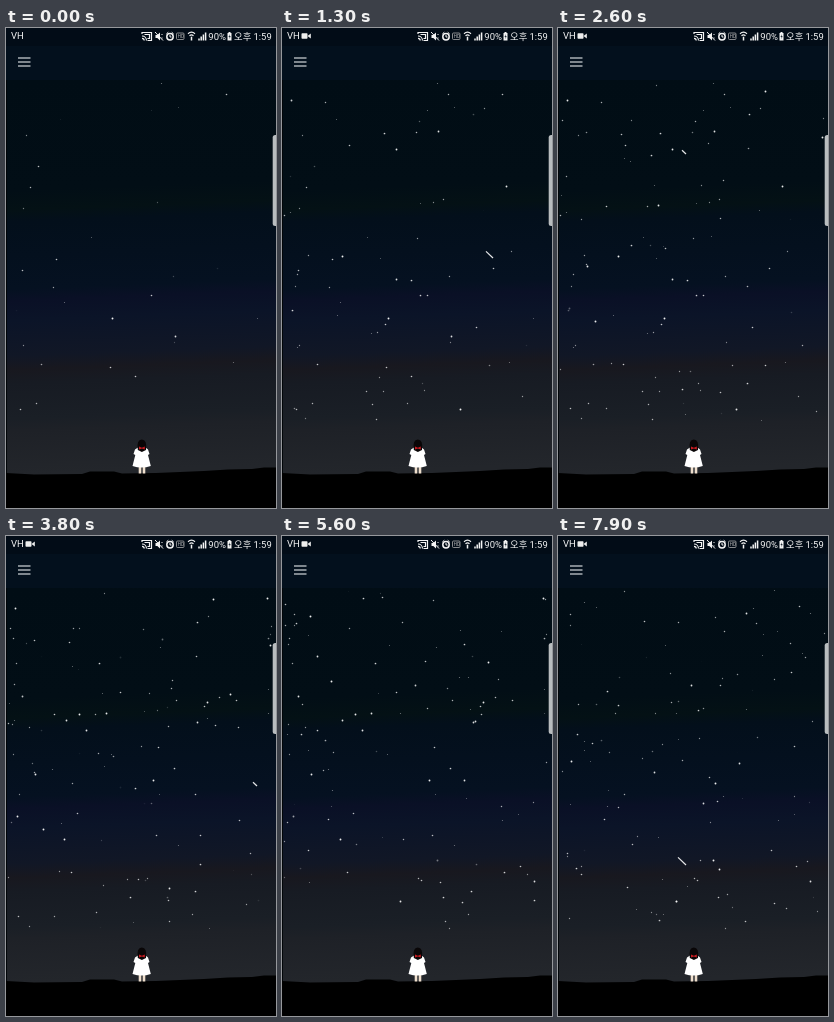
An HTML page with a canvas that plays this animation: 270x480 px, repeating every 8 s.

```html
<!DOCTYPE html>
<html lang="ko">
<head>
<meta charset="utf-8">
<title>Night sky</title>
<style>
html, body { margin: 0; width: 270px; height: 480px; overflow: hidden; background: #000; }
svg, canvas { position: absolute; left: 0; top: 0; }
text { font: 9.5px Roboto, "Noto Sans CJK KR", "Noto Sans CJK", sans-serif; fill: #f4f4f4; }
</style>
</head>
<body>
<svg width="270" height="480" viewBox="0 0 270 480">
  <defs>
    <linearGradient id="sky" gradientUnits="userSpaceOnUse" x1="0" y1="52" x2="15" y2="446">
      <stop offset="0" stop-color="#010d15"/>
      <stop offset=".28" stop-color="#020e16"/>
      <stop offset=".33" stop-color="#041115"/>
      <stop offset=".36" stop-color="#030f1b"/>
      <stop offset=".53" stop-color="#051121"/>
      <stop offset=".56" stop-color="#0a1026"/>
      <stop offset=".61" stop-color="#0b1428"/>
      <stop offset=".7" stop-color="#111726"/>
      <stop offset=".735" stop-color="#18181f"/>
      <stop offset=".77" stop-color="#171b23"/>
      <stop offset=".86" stop-color="#1a1f26"/>
      <stop offset=".89" stop-color="#1e2127"/>
      <stop offset="1" stop-color="#23262b"/>
    </linearGradient>
  </defs>
  <rect width="270" height="53" fill="#03101d"/>
  <rect width="270" height="18" fill="#020c17"/>
  <rect y="52" width="270" height="400" fill="url(#sky)"/>
  <path d="M0 52h1v394H0z" fill="#010508"/>
  <path d="M0 445L28 446.500 76 446 84 443.500 108 443.500 116 445.500 150 445 198 443 222 441.500 246 441 258 439.500 270 439.500V480H0z"/>
  <path d="M12 30h12.500M12 34h12.500M12 38h12.500" stroke="#a9afb4" stroke-width="1.300"/>
  <rect x="266.700" y="107" width="6" height="91" rx="2.500" fill="#b9bdbf"/>

  <g id="girl">
    <path d="M134 438v7.500M138 438v7.500" stroke="#efdfcd" stroke-width="2.600"/>
    <path d="M132 419.500L129 421.500 127.500 426 129.300 427 126.500 438Q135.500 441 144.800 438L142 427 143.500 426 142 421.500 139.500 419.500z" fill="#fff"/>
    <path d="M131.800 422Q130.300 411.500 135.800 411.500T140 422L135.900 424z" fill="#090607"/>
    <path d="M133 418.500l2.900 1.200 2.900-1.200v3l-2.900-1-2.900 1z" fill="#c51b20"/>
  </g>

  <text x="5" y="11.300">VH</text>
  <g id="camera" fill="#eee">
    <rect x="19.500" y="5.200" width="6" height="5.500" rx=".7"/>
    <path d="M25.500 8l3.300-2.500v5z"/>
  </g>
  <g fill="none" stroke="#f4f4f4">
    <path d="M136 6V4.500h9.500v8h-4M136 8a4.500 4.500 0 0 1 4.500 4.500M136 10.300a2.200 2.200 0 0 1 2.200 2.200M138.500 6.500h5v4h-2" stroke-width="1.200"/>
    <path d="M149.500 7h1.800l2.700-2.500v8l-2.700-2.500h-1.800z" fill="#f4f4f4" stroke="none"/>
    <path d="M149 4l8 8.500M156 6v1M156 9.500v1"/>
    <circle cx="164" cy="8.800" r="3.200" stroke-width="1.500"/>
    <path d="M164 7v2h1.500M160.300 6l2-1.800M167.700 6l-2-1.800"/>
    <rect x="170.500" y="5" width="7.500" height="6.500" rx="1" stroke="#aaa" stroke-width=".8"/>
    <path d="M182 5.700q3.500-3 7 0M183.500 7.700q2-1.700 4 0" stroke-width="1.200"/>
    <path d="M185.500 8.700v3.800" stroke-width="1.500"/>
    <path d="M193 12.500v-2M195.200 12.500v-4M197.400 12.500v-6M199.600 12.500v-8" stroke-width="1.500"/>
  </g>
  <text x="171.700" y="10.200" style="font-size:4.500px;fill:#bbb">HD</text>
  <text x="202.300" y="11.700">90%</text>
  <path d="M221.500 5h1V4h2v1h1v7.500h-4z" fill="#f4f4f4"/>
  <path d="M224 6l-1.500 3h1.200l-.5 2.300 1.500-3h-1.200z" fill="#03101d"/>
  <text x="228" y="11.700" style="font-size:9.400px">오후 1:59</text>
</svg>
<canvas id="stars" width="270" height="480"></canvas>
<script>
const LOOP = 8000, STEP = 100, FADE = 300;
const FIRST = -800, INTERVAL = 27;
const ctx = document.getElementById('stars').getContext('2d');
const camera = document.getElementById('camera');

const meteors = [
  { at: 1300, x: 211, y: 230, len: 7 },
  { at: 2600, x: 128, y: 126, len: 4 },
  { at: 3800, x: 251, y: 250, len: 4 },
  { at: 7900, x: 128, y: 329, len: 8 }
];

function random(n) {
  const v = Math.sin(n * 12.9898) * 43758.5453;
  return v - Math.floor(v);
}

// Stars appear at a steady rate; each lives a few seconds
function makeStar(i) {
  const from = FIRST + i * INTERVAL;
  const glow = random(i + 0.7);
  return {
    x: Math.floor(2 + random(i + 0.1) * 265) + 0.5,
    y: Math.floor(53 + random(i + 0.3) * 341) + 0.5,
    from,
    to: from + 2000 + random(i + 0.5) * 2500,
    radius: 0.55 + glow * 0.4,
    light: 0.35 + glow * 0.6
  };
}

const stars = Array.from({ length: Math.ceil((LOOP - FIRST) / INTERVAL) }, (_, i) => makeStar(i));

function drawStar(s, t) {
  const fade = Math.min(1, (t - s.from) / FADE, (s.to - t) / FADE);
  if (fade <= 0) return;
  ctx.globalAlpha = fade * s.light;
  ctx.beginPath();
  ctx.arc(s.x, s.y, s.radius, 0, 7);
  ctx.fill();
}

function drawMeteor(m, t) {
  const age = t - m.at;
  if (Math.abs(age) > 200) return;
  const x = m.x + age * 0.08, y = m.y + age * 0.075;
  ctx.globalAlpha = 0.9 - Math.abs(age) / 500;
  ctx.beginPath();
  ctx.moveTo(x - m.len, y - m.len * 0.95);
  ctx.lineTo(x, y);
  ctx.stroke();
}

function draw() {
  const t = Math.floor(performance.now() % LOOP / STEP) * STEP;
  ctx.clearRect(0, 0, 270, 480);
  ctx.fillStyle = ctx.strokeStyle = '#fff';
  ctx.lineWidth = 1.2;
  stars.forEach(s => drawStar(s, t));
  meteors.forEach(m => drawMeteor(m, t));
  camera.style.visibility = t < 500 ? 'hidden' : 'visible';
  requestAnimationFrame(draw);
}
draw();
</script>
</body>
</html>
```
